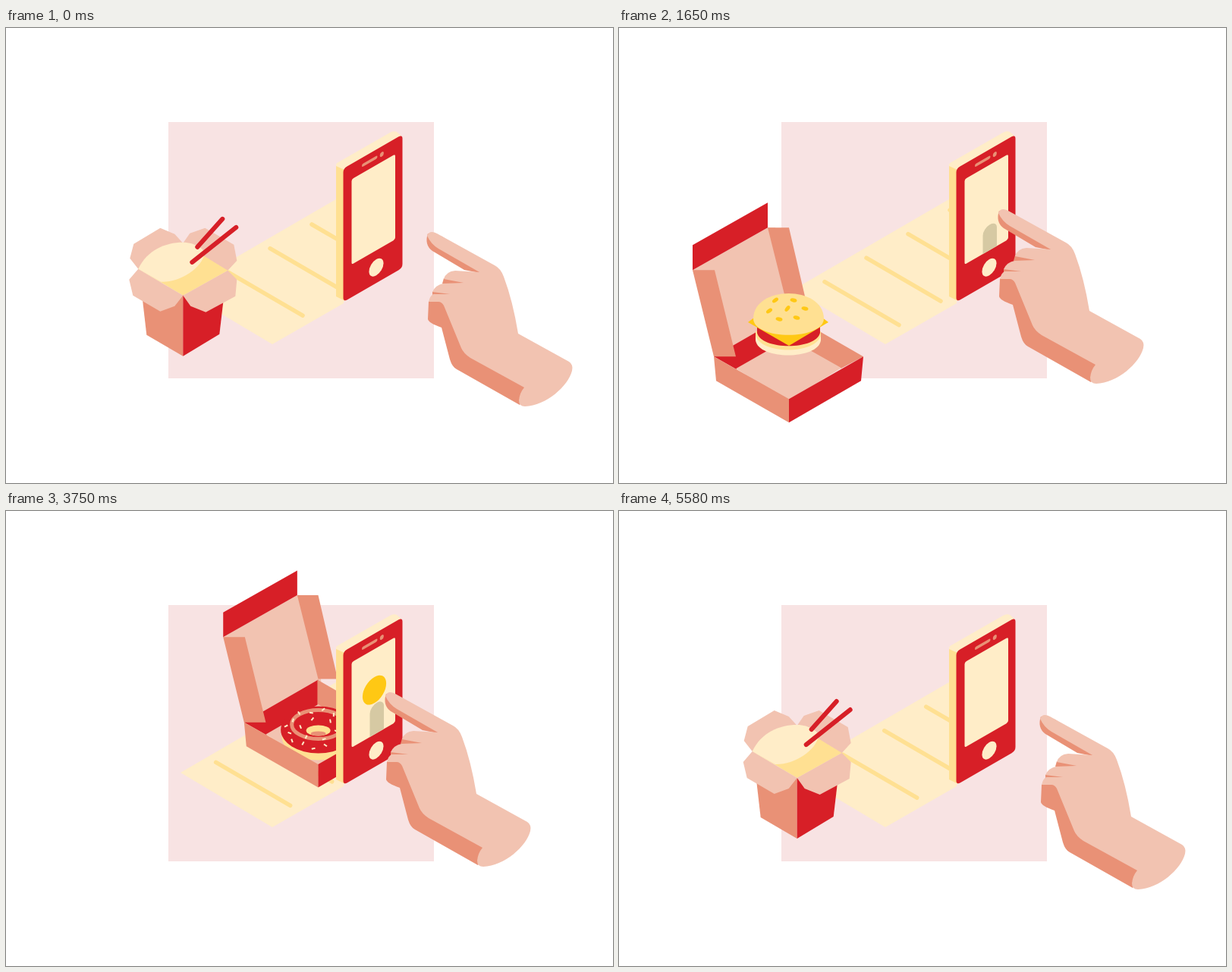
These frames come from a looping animation (800x600 px, 5.61 s). An HTML page with a canvas:

```html
<!DOCTYPE html>
<html lang="en">
<head>
<meta charset="utf-8">
<title>Food delivery</title>
<style>
html, body { margin: 0; width: 100%; height: 100%; overflow: hidden; background: #fff; }
canvas { display: block; }
</style>
</head>
<body>
<canvas id="stage" width="800" height="600"></canvas>
<script>
const ctx = document.getElementById('stage').getContext('2d');
const LOOP = 5610, HALF = LOOP / 2, GAP = 55, SLOPE = 0.573, SLIDE = 520, FALL = 300, LAG = 125;
const RED = '#d71f27', SALMON = '#e99176', SKIN = '#f2c3b1', CREAM = '#ffedc8',
      YELLOW = '#ffe092', GOLD = '#ffc814', PINK = '#f8e3e3', SHADE = '#d6c9a3';

const clamp = v => Math.max(0, Math.min(1, v));
const ease = p => p < 0.5 ? 4 * p ** 3 : 1 - (2 - 2 * p) ** 3 / 2;
const smooth = p => p * p * (3 - 2 * p);
const back = p => p <= 0 ? 0 : 1 + 2.3 * (p - 1) ** 3 + 1.3 * (p - 1) ** 2;

function fill(color, d) {
  ctx.fillStyle = color;
  ctx.fill(new Path2D(d));
}
function stroke(color, width, d) {
  ctx.strokeStyle = color;
  ctx.lineWidth = width;
  ctx.lineCap = 'round';
  ctx.stroke(new Path2D(d));
}
function oval(color, x, y, rx, ry, turn = 0) {
  ctx.fillStyle = color;
  ctx.beginPath();
  ctx.ellipse(x, y, rx, ry, turn, 0, 2 * Math.PI);
  ctx.fill();
}
function round(color, x, y, w, h, r) {
  ctx.fillStyle = color;
  ctx.beginPath();
  ctx.roundRect(x, y, w, h, r);
  ctx.fill();
}
function scaleAt(x, y, s) {
  ctx.translate(x, y);
  ctx.scale(s, s);
  ctx.translate(-x, -y);
}

function boxBack() {
  fill(SKIN, 'M97 269L196 213L206 213L228 328L154 384Z');
  fill(RED, 'M97 236L196 180V213L97 269ZM125 383L224 326V360L155 400Z');
  fill(SALMON, 'M97 269H126L154 383H125ZM196 213H224L250 325H224Z');
  fill(SALMON, 'M223 326L322 383L292 399L223 360Z');
  fill(SKIN, 'M154 399L224 359L293 398L224 441Z');
}
function boxFront() {
  fill(SALMON, 'M125 383L224 439V470L128 415Z');
  fill(RED, 'M224 439L322 383L319 415L224 470Z');
}
const smaller = draw => () => {
  ctx.translate(0, 4);
  scaleAt(211, 325, 0.986);
  draw();
};

function burger() {
  fill(CREAM, 'M180 400V412C184 438 262 438 266 412V400Z');
  fill(YELLOW, 'M180 400V405C186 431 260 431 266 405V400Z');
  fill(RED, 'M182 394V402C187 425 260 425 265 402V394Z');
  fill(GOLD, 'M170 388L178 382H268L276 388L224 419Z');
  fill(YELLOW, 'M177 383C178 339 269 339 270 383C270 412 177 412 177 383Z');
  for (const [x, y, a] of [[206, 359, -.6], [230, 359, .2], [198, 373, -.6], [222, 370, -.9],
    [245, 370, .2], [211, 384, .2], [234, 382, .3]]) oval(GOLD, x, y, 4.5, 2.5, a);
}

function donut() {
  oval(YELLOW, 224, 405, 48, 31);
  oval(RED, 224, 396, 49.5, 31);
  ctx.strokeStyle = SALMON;
  ctx.lineWidth = 5;
  ctx.beginPath();
  ctx.ellipse(224, 389, 35, 19, 0, 0, 7);
  ctx.stroke();
  oval(YELLOW, 224, 397, 16, 7);
  oval(SALMON, 224, 401, 10, 3);
  ctx.strokeStyle = CREAM;
  ctx.lineWidth = 2;
  for (let i = 0; i < 22; i++) {
    const outer = i < 16, a = i * (outer ? 0.393 : 1.05) + 0.15, wob = i % 2 * 4;
    const x = 224 + Math.cos(a) * (outer ? 43 - wob : 24), y = 395 + Math.sin(a) * (outer ? 26 - wob : 14);
    const dx = 2.4 * Math.cos(i * 2.3), dy = 2.4 * Math.sin(i * 2.3);
    ctx.beginPath();
    ctx.moveTo(x - dx, y - dy);
    ctx.lineTo(x + dx, y + dy);
    ctx.stroke();
  }
}

function fry(x, y, w) {
  const h = w / 2, d = w * 0.29, foot = 250 + (x - 250) * 0.78;
  fill(YELLOW, `M${x - h} ${y}L${x} ${y + d}L${foot} 365H${foot - h}Z`);
  fill(GOLD, `M${x + h} ${y}L${x} ${y + d}L${foot} 365H${foot + h}Z`);
  fill(CREAM, `M${x - h} ${y}L${x} ${y - d}L${x + h} ${y}L${x} ${y + d}Z`);
}

// drawn where the pack stands a little before the end of its ride
function fries() {
  ctx.translate(-25, 14);
  fill(RED, 'M194 339L274 300L314 314L233 360Z');
  for (const f of [[192, 280, 11], [207, 277, 11], [298, 227, 12], [240, 245, 12], [221, 258, 18],
    [270, 242, 18], [291, 245, 16], [257, 257, 16], [306, 249, 12], [287, 263, 12], [234, 284, 17],
    [220, 291, 16], [250, 286, 12], [270, 271, 17]]) fry(...f);
  fill(SALMON, 'M194 339L233 360L240 430L207 410Z');
  fill(RED, 'M233 360L247 352Q267 356 284 349Q299 341 299 324L314 314L303 393L240 430Z');
}

function noodles() {
  fill(SKIN, 'M174 318L163 304L168 285L203 264L222 272L233 284L242 271L262 264L300 286L304 307L292 320Z');
  fill(YELLOW, 'M174 318L233 284L292 320L233 353Z');
  fill(CREAM, 'M174 318C186 292 212 282 236 283Q254 285 262 296C258 318 228 336 204 335Z');
  stroke(RED, 6, 'M252 289L285 252');
  stroke(RED, 6, 'M245 309L303 263');
  fill(SALMON, 'M179 353H233V433L185 405Z');
  fill(RED, 'M233 353H287L281 404L233 433Z');
  fill(SKIN, 'M174 318L233 353L222 367L203 374L167 353L162 332ZM292 320L304 332L302 354L263 375L243 367L233 353Z');
}

// tap: screen reacts, slide: ride along the belt, drop: fall off its end.
// The middle part, the meal in its box, falls a moment later.
const foods = [
  { parts: [boxBack, burger, boxFront], tap: 315, slide: 905, drop: 1536, dist: 187, mid: [210, 325] },
  { parts: [fries], tap: 1567, slide: 2310, drop: 3105, dist: 214, mid: [225, 344] },
  { parts: [smaller(boxBack), donut, smaller(boxFront)], tap: 3120, slide: 3710, drop: 4315, dist: 188, mid: [210, 329] },
  { parts: [noodles], tap: 4372, slide: 5130, drop: 5910, dist: 181, mid: [233, 345] }
];

function drawFood(f, t, press) {
  const age = (t - f.tap + LOOP) % LOOP;
  if (age < 120) return;
  const left = f.dist * (1 - ease(clamp((age - f.slide + f.tap) / SLIDE)));
  const pop = back(clamp((age - 120) / 165)) * (1 - 0.062 * press);
  f.parts.forEach((draw, i) => {
    const fall = Math.max(0, age - (f.drop - f.tap) - (i === 1 ? LAG : 0));
    if (fall >= FALL) return;
    ctx.save();
    ctx.translate(left, 0.0038 * fall * fall - left * SLOPE);
    scaleAt(...f.mid, pop * (1 - clamp((fall / FALL - 0.42) / 0.58) ** 2));
    draw();
    ctx.restore();
  });
}

function drawBelt(t) {
  const belt = new Path2D('M230 345L351 417L445 363V220Z');
  const run = foods.reduce((sum, f) => sum + f.dist * ease(clamp((t - f.slide) / SLIDE)), 0);
  ctx.save();
  ctx.fillStyle = CREAM;
  ctx.fill(belt);
  ctx.clip(belt);
  for (let x = 458 - run % GAP; x > 241; x -= GAP) {
    const y = 259 + (403 - x) * SLOPE;
    stroke(YELLOW, Math.min(5.5, (x - 240) * 0.6), `M${x} ${y}l98 57`);
  }
  ctx.restore();
}

function drawPhone(t, press) {
  let bar = 0, dot = 0;
  for (const f of foods) {
    const age = t - f.tap, gone = clamp((t - f.slide - 50) / 120);
    if (age > 0 && gone < 1) {
      bar = clamp(age / 100) * (1 - gone);
      dot = back(clamp((age - 100) / 130)) * (1 - gone);
    }
  }
  ctx.save();
  scaleAt(479, 248, 1 - 0.043 * press);
  fill(YELLOW, 'M435 181L447 184V360L435 354Z');
  fill(CREAM, 'M435 182Q434 179 438 177L506 138Q511 135 515 137L521 142L446 187Z');
  // front face, sheared around its left edge
  ctx.transform(1, -0.577, 0, 1, 0, 0.577 * 445);
  round(RED, 444.5, 185, 78, 176, 5);
  round(CREAM, 455.5, 205.5, 57.5, 112.5, 2.5);
  oval(CREAM, 488, 340.5, 9.5, 10.6);
  stroke(SALMON, 4, 'M471 195.5H487.5');
  oval(SALMON, 495.3, 195.5, 2.6, 3);
  if (bar > 0) {
    ctx.save();
    ctx.beginPath();
    ctx.rect(455, 206, 58, 112);
    ctx.clip();
    round(SHADE, 479.5, 318 - 40 * bar, 18.5, 60, 9.2);
    ctx.restore();
  }
  const size = dot * (1 + 0.2 * press);
  if (size > 0) oval(GOLD, 485.5, 259.5, 15.6 * size, 17.2 * size);
  ctx.restore();
}

// [time, reach]: 0 at ease, 1 touching the screen
const reach = [[0, 0], [30, 0], [150, -.22], [330, 1], [948, 1], [1130, -.22], [1230, -.22],
  [1530, 1], [2310, 1], [2510, -.22], [2660, 0], [HALF, 0]];

function drawHand(t, press) {
  const i = reach.findIndex(k => k[0] > t), [t0, a] = reach[i - 1], [t1, b] = reach[i];
  const r = a + (b - a) * smooth((t - t0) / (t1 - t0)) + 0.33 * press;
  ctx.save();
  ctx.translate(-55 * r, -30 * r);
  fill(SALMON, 'M556 271Q551 286 562 294L604 319L624 323L577 330L575 337L603 338L562 348V352L585 352' +
    'L557 361L556 384Q557 389 574 395L585 437Q588 447 594 450L677 497L692 475L625 420L640 330L575 275Z');
  fill(SKIN, 'M555 274Q558 266 568 271L644 313Q652 317 656 328Q668 360 675 403L742 440Q748 444 746 452' +
    'C741 472 712 498 684 499Q676 499 676 491Q677 481 683 474L612 435Q603 429 600 422L577 366Q574 361 570 361' +
    'H557Q559 353 563 351H585L562 348Q566 339 576 337L603 336L577 331Q580 321 592 320L624 322L570 291Q560 285 555 274Z');
  ctx.restore();
}

function frame(now) {
  const t = now % LOOP, half = t % HALF;
  const press = smooth(clamp(1 - Math.abs(half - 632) / 75));
  ctx.fillStyle = '#fff';
  ctx.fillRect(0, 0, 800, 600);
  ctx.fillStyle = PINK;
  ctx.fillRect(214, 124, 350, 338);
  drawBelt(t);
  for (const f of foods) drawFood(f, t, press);
  drawPhone(t, press);
  drawHand(half, press);
  requestAnimationFrame(loop);
}
const start = performance.now();
function loop() { frame(performance.now() - start); }
loop();
</script>
</body>
</html>
```
